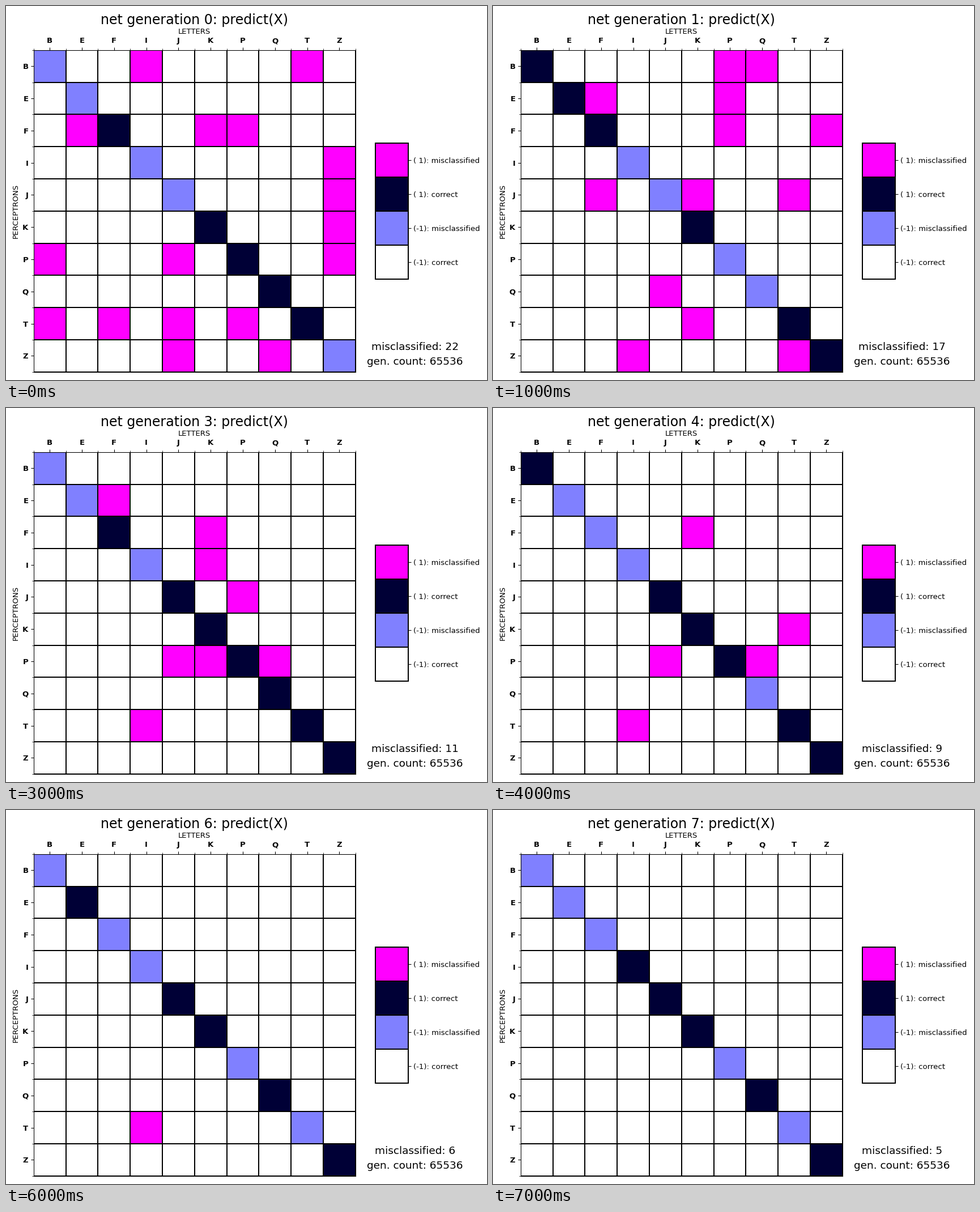
Recreate the animation shown at these times as a matplotlib script. Size 849 by 660 pixels, loop 8 s.

```python
import numpy as np
import matplotlib.pyplot as plt
from matplotlib.animation import FuncAnimation
from matplotlib.colors import ListedColormap

W, H, DPI = 849, 660, 96
SCALE = 95 / 96
BASE, LARGE, TITLE = 10 * SCALE, 14 * SCALE, 18 * SCALE
LETTERS = "BEFIJKPQTZ"
N = len(LETTERS)
QUIET, MISSED, HIT, FALSE_HIT = range(4)
CMAP = ListedColormap(["white", "#8080ff", "#000036", "#ff00ff"])

# Per generation: missed letters, then false hits as perceptron + letter.
GENERATIONS = [
    ("BEIJZ", "BI BT FE FK FP IZ JZ KZ PB PJ PZ TB TF TJ TP ZJ ZQ"),
    ("IJPQ", "BP BQ EF EP FP FZ JF JK JT QJ TK ZI ZT"),
    ("BEJQTZ", "FE FK IZ PB PF PQ ZJ"),
    ("BEI", "EF FK IK JP PJ PK PQ TI"),
    ("EFIQ", "FK KT PJ PQ TI"),
    ("BEFIQT", "KT TI"),
    ("BFIPT", "TI"),
    ("BEFPT", ""),
]


def predictions(missed, false_hits):
    grid = np.full((N, N), QUIET)
    np.fill_diagonal(grid, HIT)
    for letter in missed:
        k = LETTERS.index(letter)
        grid[k, k] = MISSED
    for row, col in false_hits.split():
        grid[LETTERS.index(row), LETTERS.index(col)] = FALSE_HIT
    return grid


def pixel_axes(left, top, width, height):
    return fig.add_axes([left / W, 1 - (top + height) / H, width / W, height / H])


def cells(ax, values):
    """Coloured cells with black lines on every boundary."""
    rows, cols = values.shape
    for x in range(cols + 1):
        ax.axvline(x, color="black", linewidth=1.5)
    for y in range(rows + 1):
        ax.axhline(y, color="black", linewidth=1.5)
    mesh = ax.pcolormesh(values, cmap=CMAP, vmin=0, vmax=3)
    ax.set(xlim=(0, cols), ylim=(0, rows))
    return mesh


def label(x, y, text, size=BASE, **kw):
    return fig.text(x / W, 1 - y / H, text, fontsize=size, ha="center", **kw)


plt.rcParams["font.family"] = "DejaVu Sans"
fig = plt.figure(figsize=(W / DPI, H / DPI), dpi=DPI, facecolor="white")

ax = pixel_axes(48.8, 77.8, 568, 568)
mesh = cells(ax, predictions(*GENERATIONS[0]))
ax.invert_yaxis()
ax.xaxis.tick_top()
centres = np.arange(N) + 0.5
for axis in (ax.xaxis, ax.yaxis):
    axis.set_ticks(centres, list(LETTERS), fontsize=BASE, fontweight="bold")
    axis.set_ticks(np.arange(N + 1), minor=True)

key = pixel_axes(652, 242, 58, 240)
cells(key, np.arange(4).reshape(4, 1))
key.set_xticks([])
key.yaxis.tick_right()
key.set_yticks(np.arange(4) + 0.5,
               ["(-1): correct", "(-1): misclassified",
                "( 1): correct", "( 1): misclassified"], fontsize=BASE)
key.tick_params(axis="y", pad=3)
for spine in key.spines.values():
    spine.set_linewidth(1.5)

label(332.8, 49.4, "LETTERS")
label(17.4, 362, "PERCEPTRONS", rotation=90, va="center")
title = label(332.8, 32, "", TITLE)
errors = label(722, 607, "", LARGE)
label(722, 633, "gen. count: 65536", LARGE)


def update(gen):
    missed, false_hits = GENERATIONS[gen]
    mesh.set_array(predictions(missed, false_hits))
    title.set_text(f"net generation {gen}: predict(X)")
    errors.set_text(f"misclassified: {len(missed) + len(false_hits.split())}")
    return mesh, title, errors


anim = FuncAnimation(fig, update, frames=len(GENERATIONS), interval=1000,
                     repeat=True, repeat_delay=0)
plt.show()
```
